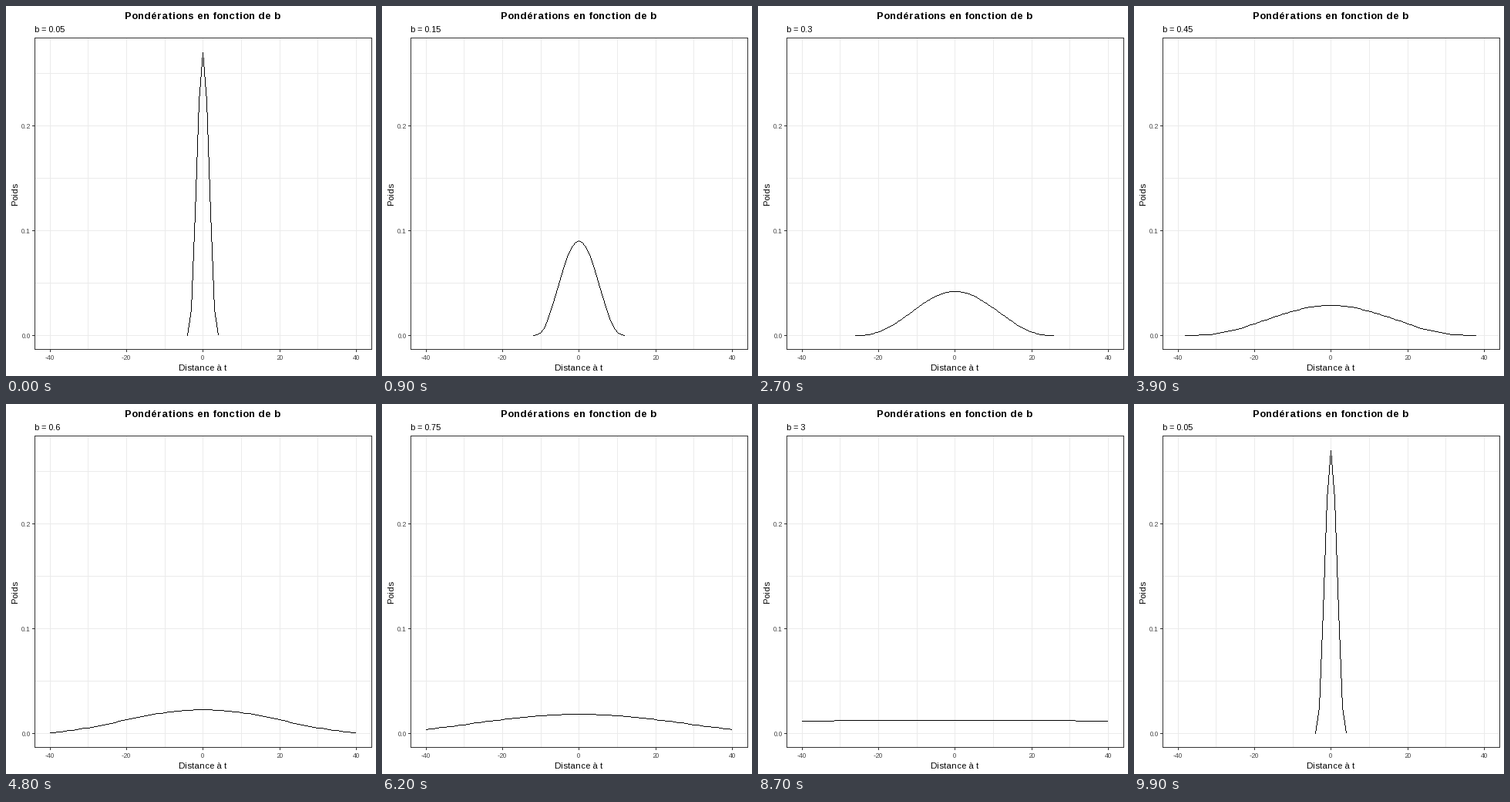
These frames come from a looping animation (480x480 px, 10 s). A matplotlib script:

```python
import numpy as np
import matplotlib.pyplot as plt
from matplotlib.animation import FuncAnimation
from matplotlib.collections import PolyCollection
from matplotlib.patches import Rectangle

plt.rcParams.update({"font.family": "Liberation Sans",
                     "text.hinting": "force_autohint",
                     "text.hinting_factor": 1})

SIZE, DPI = 480, 80
PX = 72 / DPI                      # points per pixel
LEFT, TOP, RIGHT, BOTTOM = 37, 41, 474, 445
GRID, DARK, TICK_TEXT = "#EBEBEB", "#333333", "#4D4D4D"
UNIT_SQUARE = np.array([[0, 0], [1, 0], [1, 1], [0, 1]])

N_FRAMES, INTERVAL = 100, 100
BANDWIDTHS = [round(0.05 * i, 2) for i in range(1, 21)] + [2, 3, 4, 5]
# Frame at which each state settles; the last one is the return to the first.
STARTS = np.cumsum([0, 4] + [5] * 4 + [4] * 6 + [3] + [4] * 12)


def to_pixels(x, y):
    """Column and row of the pixels that hold the given data points."""
    points = np.stack(np.broadcast_arrays(255.7 + 4.966 * np.asarray(x),
                                          427.4 - 1360.6 * np.asarray(y)), -1)
    return np.floor(points).astype(int)


def kernel(b):
    """Normalised triweight weights over a window of at most 81 points."""
    h = 81 * b
    reach = min(40, int(h))
    x = np.arange(-reach, reach + 1.0)
    w = (1 - (x / h) ** 2) ** 3
    return x, w / w.sum()


def add_points(x, y, count):
    """Insert evenly spaced points along a curve."""
    if count <= 0:
        return x, y
    step = (x[-1] - x[0]) / count
    extra = x[0] + step * (np.arange(count) + 0.5)
    merged = np.sort(np.concatenate([x, extra]))
    return merged, np.interp(merged, x, y)


def halfway(a, b):
    n = max(len(a[0]), len(b[0]))
    a, b = (add_points(x, y, n - len(x)) for x, y in (a, b))
    return (a[0] + b[0]) / 2, (a[1] + b[1]) / 2


def trace(vertices):
    """Pixels of a one-pixel polyline without smoothing, end excluded."""
    runs = []
    for start, end in zip(vertices[:-1], vertices[1:]):
        n = max(abs(end - start).max(), 1)
        t = np.arange(n)[:, None] / n
        runs.append(np.floor(start + t * (end - start) + 0.5))
    return np.unique(np.concatenate(runs), axis=0)


CURVES = [kernel(b) for b in BANDWIDTHS]

fig = plt.figure(figsize=(SIZE / DPI, SIZE / DPI), dpi=DPI, facecolor="white")
ax = fig.add_axes([0, 0, 1, 1])
ax.set(xlim=(0, SIZE), ylim=(SIZE, 0))
ax.axis("off")


def bar(x, y, width, height, color, z):
    ax.add_patch(Rectangle((x, y), width, height, facecolor=color, lw=0,
                           zorder=z))


def label(x, y, text, size, color="black", **kw):
    return ax.text(x, y, text, fontsize=size * PX, color=color,
                   va="baseline", zorder=5, **kw)


for value in range(-40, 41, 10):
    x = to_pixels(value, 0)[0]
    bar(x, TOP, 1, BOTTOM - TOP, GRID, 1)
    if value % 20 == 0:
        bar(x, BOTTOM, 1, 4, DARK, 3)
        label(x, 459, str(value), 9, TICK_TEXT, ha="center")

for i in range(6):
    y = to_pixels(0, 0.05 * i)[1]
    bar(LEFT, y, RIGHT - LEFT, 1, GRID, 1)
    if i % 2 == 0:
        bar(LEFT - 3, y, 3, 1, DARK, 3)
        label(32, y + 4, f"{0.05 * i:.1f}", 9, TICK_TEXT, ha="right")

for x in (LEFT, RIGHT):
    bar(x, TOP, 1, BOTTOM - TOP + 1, DARK, 4)
for y in (TOP, BOTTOM):
    bar(LEFT, y, RIGHT - LEFT + 1, 1, DARK, 4)

label(254.5, 17, "Pondérations en fonction de b", 13.5, ha="center",
      weight="bold")
label(255, 473, "Distance à t", 11, ha="center")
label(15, 244, "Poids", 11, ha="center", rotation=90, rotation_mode="anchor")
subtitle = label(37, 34, "", 11, ha="left")
curve = PolyCollection([], facecolors="black", linewidths=0, zorder=2)
ax.add_collection(curve, autolim=False)


def update(frame):
    k = int(np.searchsorted(STARTS, frame, side="right")) - 1
    state = k % len(BANDWIDTHS)
    points = CURVES[state]
    if frame + 1 in STARTS:
        points = halfway(points, CURVES[(state + 1) % len(CURVES)])
    pixels = trace(to_pixels(*points))
    curve.set_verts(pixels[:, None, :] + UNIT_SQUARE)
    subtitle.set_text(f"b = {BANDWIDTHS[state]:g}")
    return curve, subtitle


anim = FuncAnimation(fig, update, frames=N_FRAMES, interval=INTERVAL,
                     repeat=True, repeat_delay=0)
plt.show()
```
